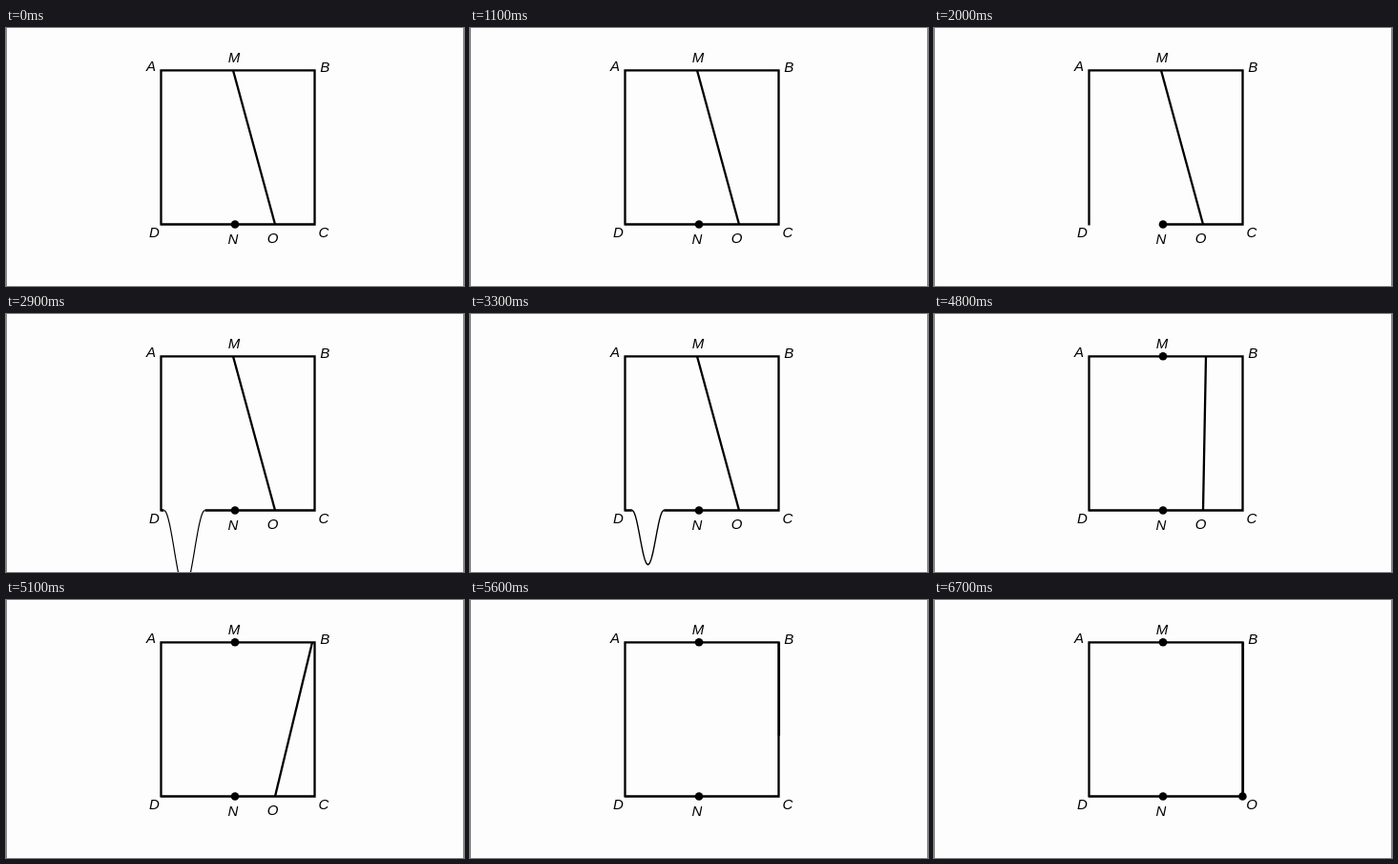
An HTML page that plays this animation: 480x270 px, repeating every 8000 ms.

```html
<!DOCTYPE html>
<html lang="en">
<head>
<meta charset="utf-8">
<title>Square and moving segment</title>
<style>
  html, body { margin: 0; width: 100%; height: 100%; overflow: hidden; background: #fdfdfd; }
  svg { display: block; width: 480px; height: 270px; }
  .line { fill: none; stroke: #000; stroke-width: 2.3; }
  text { font: italic 15px "Liberation Sans", Arial, sans-serif; text-anchor: middle; }
</style>
</head>
<body>
<svg viewBox="0 0 480 270">
  <rect width="480" height="270" fill="#fdfdfd"/>
  <path d="M.5 0V270M479.5 0V270" stroke="#888"/>
  <path class="line" d="M162.5 206.5V44.3H323.5V205.5H240"/>
  <path class="line" id="flat"/>
  <path class="line" id="dip"/>
  <path class="line" id="swing"/>
  <path class="line" id="trail"/>
  <circle id="dotM" cx="240" cy="44.3" r="4.3"/>
  <circle cx="240" cy="205.5" r="4.3"/>
  <circle id="dotC" cx="323.4" cy="205.5" r="4.3"/>
  <text x="152" y="45">A</text>
  <text x="334.3" y="46">B</text>
  <text x="239" y="36.3">M</text>
  <text x="155.3" y="219.3">D</text>
  <text x="238" y="226.3">N</text>
  <text id="labelO" x="279.5" y="225.3">O</text>
  <text id="labelC" x="333" y="219.3">C</text>
</svg>
<script>
  const LOOP = 8000, STEP = 100;
  const TOP = 44.3, BASE = 205.5, LEFT = 162.5, RIGHT = 323.5, MID = 240;
  const el = id => document.getElementById(id);
  const show = (id, on) => el(id).setAttribute("visibility", on ? "visible" : "hidden");
  const draw = (id, d) => el(id).setAttribute("d", d);

  // Piecewise linear value through [time, value] points
  function track(t, points) {
    if (t <= points[0][0]) return points[0][1];
    for (let i = 1; i < points.length; i++) {
      const [t0, a] = points[i - 1], [t1, b] = points[i];
      if (t <= t1) return a + (b - a) * (t - t0) / (t1 - t0);
    }
    return points[points.length - 1][1];
  }

  // Side DN: cut away, then pulled up as a narrowing dip
  function drawBase(t) {
    const gone = t >= 1700 && t < 2400;
    const dipping = t >= 2400 && t < 3800;
    show("flat", !gone);
    show("dip", dipping);
    if (!dipping) return draw("flat", `M${LEFT} ${BASE}H${MID}`);

    const center = track(t, [[2400, 199.5], [2900, 187], [3200, 186.5]]);
    const half = track(t, [[2400, 37], [2900, 21.5], [3200, 17], [3800, 15]]);
    const depth = track(t, [[2400, 260], [2900, 82], [3200, 68], [3800, 0]]);
    draw("flat", `M${LEFT} ${BASE}H${center - half}M${center + half} ${BASE}H${MID}`);

    const points = [];
    for (let i = -30; i <= 30; i++) {
      const u = i / 30;
      const y = BASE + depth * (1 + Math.cos(Math.PI * u)) / 2;
      points.push(`${(center + half * u).toFixed(2)} ${y.toFixed(2)}`);
    }
    draw("dip", "M" + points.join("L"));
    el("dip").style.strokeWidth = Math.max(1.2, 2.3 - depth * 0.016);
  }

  // Segment MO: its upper end runs to B, then a trace runs down to C
  function drawSegment(t) {
    const x = track(t, [[4400, 238], [4800, 285], [5100, 321]]);
    draw("swing", `M${x} ${TOP}L282 ${BASE}`);
    show("swing", t < 5200);
    const y = track(t, [[5100, TOP], [5300, 104], [6100, BASE]]);
    draw("trail", `M${RIGHT + 0.4} ${TOP}V${y}`);
    show("trail", t >= 5200);
  }

  function frame(now) {
    const t = Math.floor(now % LOOP / STEP) * STEP;
    drawBase(t);
    drawSegment(t);
    show("dotM", t >= 4500);
    show("dotC", t >= 6700);
    show("labelO", t < 5200);
    el("labelC").textContent = t < 6100 ? "C" : "O";
    requestAnimationFrame(() => frame(performance.now() - start));
  }

  const start = performance.now();
  frame(0);
</script>
</body>
</html>
```
